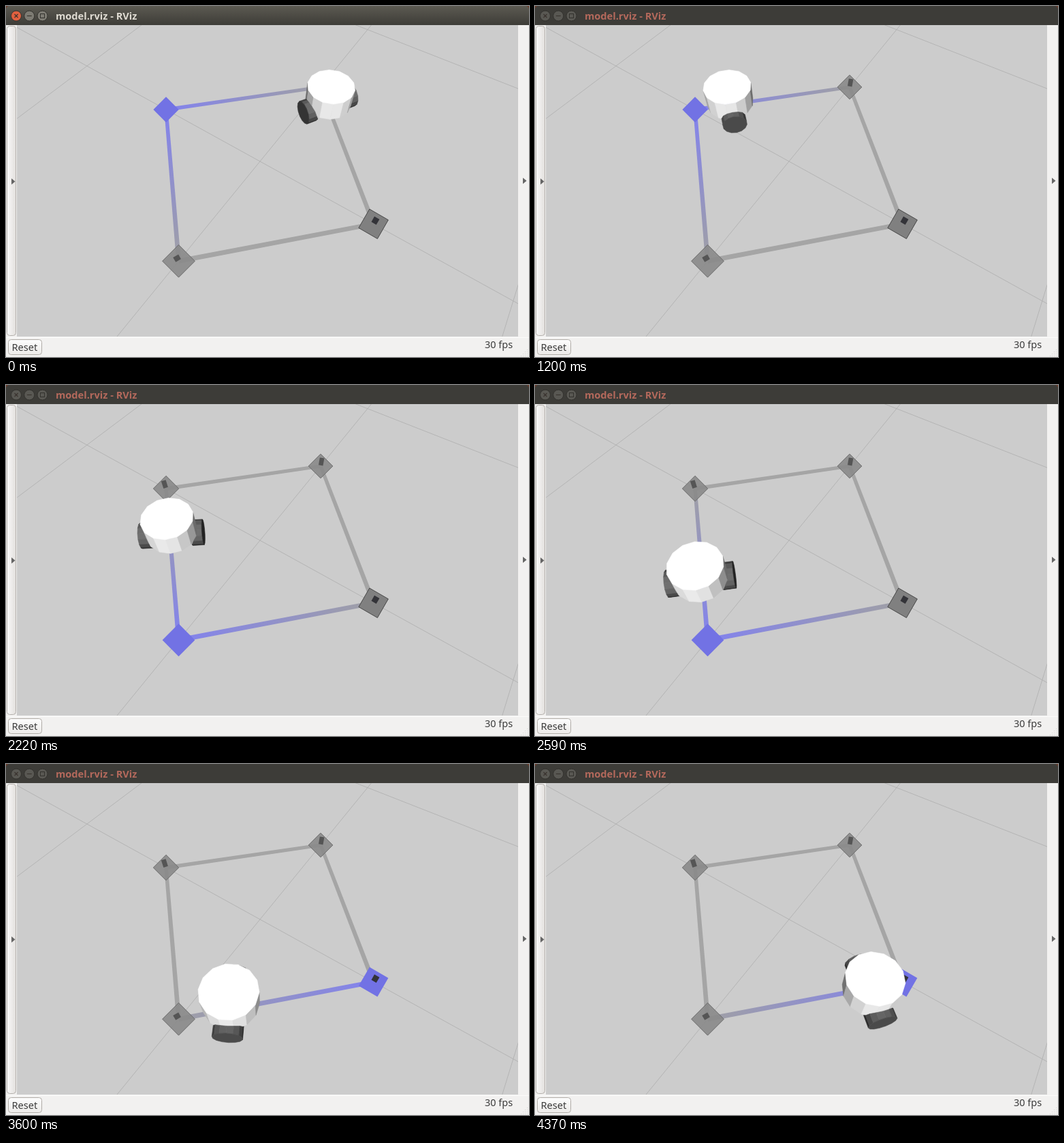
These frames come from a looping animation (768 px wide and 515 px high, 4390 ms). An HTML page with a canvas:

```html
<!DOCTYPE html>
<html lang="en">
<head>
<meta charset="utf-8">
<title>model.rviz - RViz</title>
<style>
  html, body { margin: 0; width: 100%; height: 100%; overflow: hidden; background: #f2f1f0; }
  canvas { display: block; }
</style>
</head>
<body>
<canvas id="stage" width="768" height="515"></canvas>
<script>
const ctx = document.getElementById('stage').getContext('2d');
const LOOP = 4390, TAU = Math.PI * 2, DEG = TAU / 360, SIDES = 14;
const FONT = '"Noto Sans", "Open Sans", sans-serif';

// Perspective of the ground axes u, v and the height h
const CAM = [-1.418, -0.987, 2.498], LIGHT = [-0.442, -0.285, 0.852];
const depth = ([u, v, h = 0]) => 1 + 0.146 * u + 0.094 * v - 0.281 * h;
function project([u, v, h = 0]) {
  const w = depth([u, v, h]);
  return [(373 + 156.5 * u - 115.9 * v - 106.7 * h) / w,
          (228 - 91.6 * u - 61.7 * v - 167.9 * h) / w];
}
const dot = (a, b) => a[0] * b[0] + a[1] * b[1] + a[2] * b[2];

const WAYPOINTS = [[1, 0], [0, 1], [-1, 0], [0, -1]];
// Time in s, u, v, heading in degrees, speed
const KEYS = [
  [0, .764, -.187, 59, .4],
  [.51, .65, .103, 122, 1],
  [1.32, .105, .765, 140, .5],
  [1.73, .06, .783, 197, .4],
  [2.22, -.384, .564, 218, 1],
  [2.95, -.896, .1, 227, .4],
  [3.27, -.885, .03, 293, 1],
  [4.4, -.22, -.858, 319, 1]
];

// The robot always moves along its heading: a cubic curve between two keys
function poseAt(t) {
  const i = KEYS.findIndex(k => k[0] > t), a = KEYS[i - 1], b = KEYS[i];
  const span = b[0] - a[0], s = (t - a[0]) / span;
  const go = s * s * (3 - 2 * s), leave = s * (1 - s) ** 2, arrive = s * s * (s - 1);
  const axis = (n, wave) => a[n] + (b[n] - a[n]) * go + span *
    (leave * a[4] * wave(a[3] * DEG) + arrive * b[4] * wave(b[3] * DEG));
  return [axis(1, Math.cos), axis(2, Math.sin), (a[3] + (b[3] - a[3]) * s) * DEG];
}

function polygon(points, fill, stroke, width = 1) {
  ctx.beginPath();
  points.forEach(p => ctx.lineTo(p[0], p[1]));
  ctx.closePath();
  ctx.fillStyle = fill;
  ctx.fill();
  if (stroke) {
    ctx.strokeStyle = stroke;
    ctx.lineWidth = width;
    ctx.stroke();
  }
}
function line(x1, y1, x2, y2, color, width = 1) {
  ctx.beginPath();
  ctx.moveTo(x1, y1);
  ctx.lineTo(x2, y2);
  ctx.strokeStyle = color;
  ctx.lineWidth = width;
  ctx.stroke();
}
function box(x, y, w, h, r, fill, stroke) {
  ctx.beginPath();
  ctx.roundRect(x, y, w, h, r);
  ctx.fillStyle = fill;
  ctx.fill();
  if (stroke) {
    ctx.strokeStyle = stroke;
    ctx.lineWidth = 1;
    ctx.stroke();
  }
}
function blend(x1, y1, x2, y2, from, to) {
  const g = ctx.createLinearGradient(x1, y1, x2, y2);
  g.addColorStop(0, from);
  g.addColorStop(1, to);
  return g;
}
function label(text, x, y, color, size, weight = 400) {
  ctx.font = `${weight} ${size}px ${FONT}`;
  ctx.fillStyle = color;
  ctx.fillText(text, x, y);
}

// One lit face, skipped when it looks away from the camera
function face(points, normal, tone) {
  const p = points[0];
  if (dot(normal, CAM.map((c, i) => c - p[i])) <= 0) return;
  const lit = tone * (0.42 + 0.95 * Math.max(0, dot(normal, LIGHT)));
  const c = Math.min(255, Math.round(255 * lit));
  const color = `rgb(${c},${c},${c})`;
  polygon(points.map(project), color, color, 0.6);
}

const RADIUS = 0.194, BOTTOM = 0.12, TOP = 0.3;
function drawBody(u, v, heading) {
  const ring = h => Array.from({ length: SIDES }, (_, i) => {
    const a = heading + i * TAU / SIDES;
    return [u + RADIUS * Math.cos(a), v + RADIUS * Math.sin(a), h];
  });
  const low = ring(BOTTOM), top = ring(TOP);
  for (let i = 0; i < SIDES; i++) {
    const j = (i + 1) % SIDES, a = heading + (i + 0.5) * TAU / SIDES;
    face([low[i], low[j], top[j], top[i]], [Math.cos(a), Math.sin(a), 0], 1);
  }
  face(top, [0, 0, 1], 1);
}

function drawWheel(u, v, heading, axle) {
  const r = 0.1, cx = Math.cos(heading), cy = Math.sin(heading);
  const inner = [], outer = [];
  for (let i = 0; i < SIDES; i++) {
    const a = i * TAU / SIDES, s = r * Math.sin(a), h = r + r * Math.cos(a);
    const at = d => [u + axle[0] * d + cx * s, v + axle[1] * d + cy * s, h];
    // The upper part starts where it leaves the body
    inner.push(at(h < r ? 0.15 : Math.sqrt(RADIUS * RADIUS - s * s)));
    outer.push(at(0.24));
  }
  for (let i = 0; i < SIDES; i++) {
    const j = (i + 1) % SIDES, a = (i + 0.5) * TAU / SIDES, s = Math.sin(a);
    face([inner[i], inner[j], outer[j], outer[i]], [cx * s, cy * s, Math.cos(a)], 0.32);
  }
  face(outer, axle, 0.32);
}

function drawRobot(t) {
  const [u, v, heading] = poseAt(t);
  const wheels = [1, -1].map(side => {
    const axle = [-side * Math.sin(heading), side * Math.cos(heading), 0];
    return { axle, near: dot(axle, [CAM[0] - u, CAM[1] - v, 0]) > 0.8 };
  });
  const draw = near => wheels.filter(w => w.near === near)
    .forEach(w => drawWheel(u, v, heading, w.axle));
  draw(false);
  drawBody(u, v, heading);
  draw(true);
}

// A strip that faces the camera and gets wider as it comes nearer
function strip(a, b, size, fill) {
  const p = project(a), q = project(b);
  const len = Math.hypot(q[0] - p[0], q[1] - p[1]);
  const nx = (q[1] - p[1]) / len, ny = (p[0] - q[0]) / len;
  const side = (c, d, sign) => {
    const k = sign * size / 2 / depth(d);
    return [c[0] + nx * k, c[1] + ny * k];
  };
  polygon([side(p, a, 1), side(q, b, 1), side(q, b, -1), side(p, a, -1)], fill);
}

function drawPlate(point, fill, edge, tilt) {
  const [x, y] = project(point), r = 20.4 / depth(point);
  const corners = [0, 1, 2, 3].map(i => {
    const a = i * TAU / 4 + tilt;
    return [x + r * Math.cos(a), y + r * Math.sin(a)];
  });
  polygon(corners, fill, edge);
}

function drawRoute(target) {
  const blue = '#8282ee', fade = '#a0a0a4';
  WAYPOINTS.forEach((a, i) => {
    const b = WAYPOINTS[(i + 1) % 4], ends = [...project(a), ...project(b)];
    let fill = '#a5a5a5';
    if (i === target - 1) fill = blend(...ends, fade, blue);
    else if (i === target && i < 3) fill = blend(...ends, blue, fade);
    strip(a, b, 5.9, fill);
  });
  WAYPOINTS.forEach((p, i) => {
    const last = i === 3, tilt = last ? -15 * DEG : 0;
    if (i === target) drawPlate(p, '#7272e4', null, tilt);
    else drawPlate(p, last ? '#808080' : 'rgba(138,138,138,.9)', last ? '#484848' : '#6c6c6c', tilt);
    if (i !== target || last) strip([...p, 0.01], [...p, 0.1], 7.5, last ? '#333338' : '#555');
  });
}

function drawScene(t) {
  ctx.save();
  ctx.beginPath();
  ctx.rect(16, 28, 736, 457);
  ctx.clip();
  ctx.fillStyle = '#ccc';
  ctx.fillRect(16, 28, 736, 457);
  for (let k = -2; k <= 2; k += 2) {
    line(...project([k, -4]), ...project([k, 4]), '#b4b4b4');
    line(...project([-4, k]), ...project([4, k]), '#b4b4b4');
  }
  drawRoute(t < 1.32 ? 1 : t < 2.97 ? 2 : 3);
  drawRobot(t);
  ctx.restore();
}

function drawTitle(active) {
  ctx.fillStyle = '#6b3a28';
  ctx.fillRect(0, 0, 768, 28);
  box(0, 0, 768, 28, [5, 5, 0, 0],
    active ? blend(0, 0, 0, 28, '#5c5a52', '#3d3c37') : '#3d3c38');
  const ink = '#3a3530';
  for (let i = 0; i < 3; i++) {
    const x = 15 + i * 19.25;
    ctx.beginPath();
    ctx.arc(x, 14.5, 7.5, 0, TAU);
    ctx.fillStyle = !active ? '#595853' : i ? '#7d7b73' : '#e0603f';
    ctx.fill();
    ctx.strokeStyle = '#33322e';
    ctx.lineWidth = 1;
    ctx.stroke();
    if (i === 0) {
      line(x - 2.5, 12, x + 2.5, 17, ink, 1.2);
      line(x + 2.5, 12, x - 2.5, 17, ink, 1.2);
    } else if (i === 1) line(x - 3.5, 14.5, x + 3.5, 14.5, ink, 1.2);
    else ctx.strokeRect(x - 3, 11.5, 6, 6);
  }
  label('model.rviz - RViz', 73, 20, active ? '#dfdbd2' : '#b4695c', 14.6, 700);
}

function drawFrame(active) {
  ctx.fillStyle = '#f2f1f0';
  ctx.fillRect(0, 0, 768, 515);
  drawTitle(active);
  box(1.5, 29.5, 13, 454, 4, blend(1, 0, 15, 0, '#fafafa', '#e2dfdc'), '#b3afab');
  for (const [x, y] of [[8, 257.5], [759, 256.5]])
    polygon([[x, y - 4.5], [x + 5.5, y], [x, y + 4.5]], '#666');
  line(0, 486.5, 768, 486.5, '#fcfcfb');
  box(3.5, 489.5, 49, 22, 4, blend(0, 489, 0, 512, '#fdfdfd', '#eceae8'), '#b0aca7');
  label('Reset', 8.5, 506, '#3c3c3c', 14.6);
  label('30 fps', 703, 502, '#3c3c3c', 14.5);
  ctx.fillStyle = '#d6d3d0';
  for (let i = 0; i < 4; i++)
    for (let j = 3 - i; j < 4; j++) ctx.fillRect(756 + j * 3, 504 + i * 3, 1, 1);
}

function tick() {
  const t = performance.now() % LOOP / 1000;
  drawFrame(t < 0.04);
  drawScene(t);
  requestAnimationFrame(tick);
}
tick();
</script>
</body>
</html>
```
